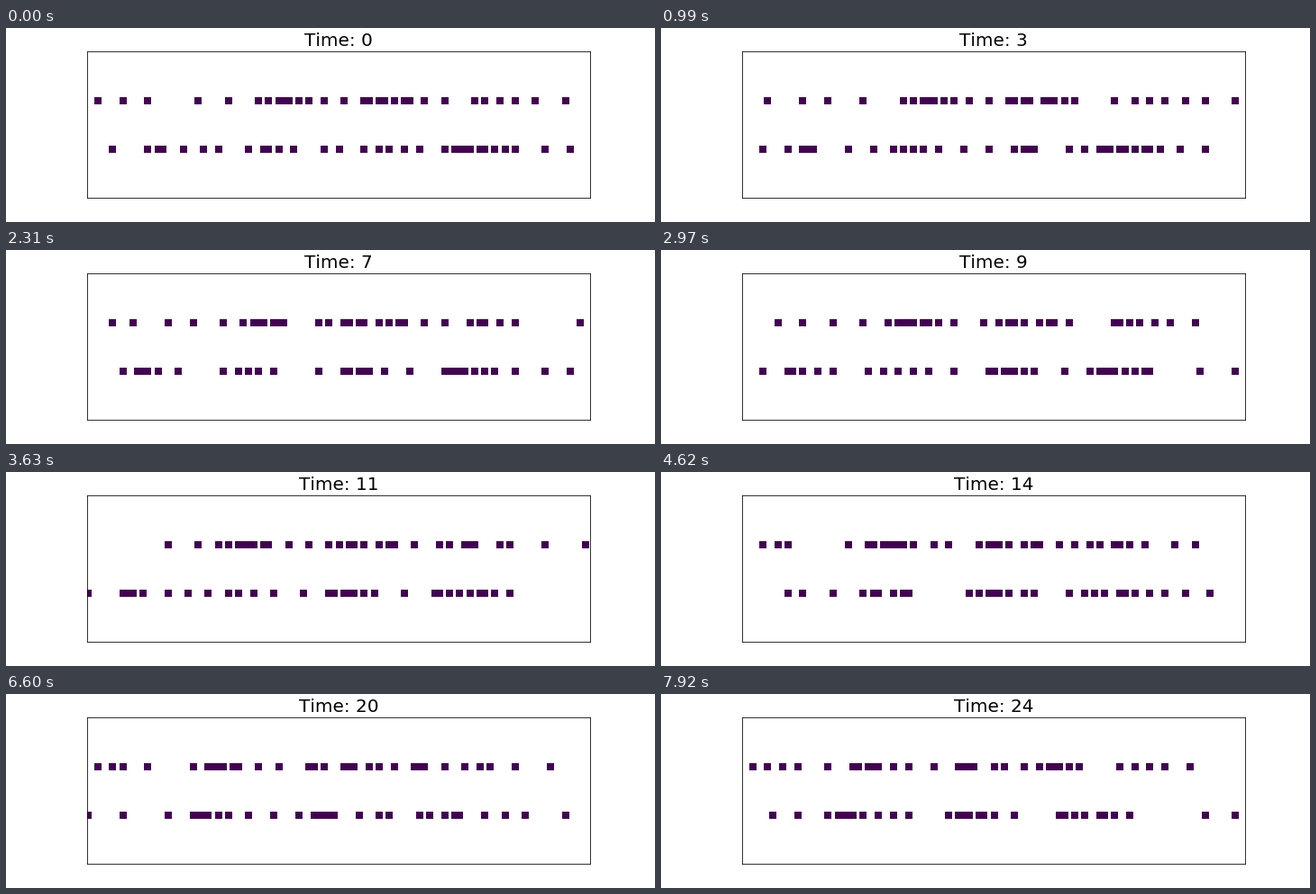
Write a matplotlib script that moves like this. It is 720x216 px and loops after 8000 ms.

```python
import math
import random

import matplotlib.pyplot as plt
from matplotlib.animation import FuncAnimation

CELLS = 100
CARS_PER_LANE = 30
V_MAX = 5
P_SLOW = 0.3
P_CHANGE = 0.3
WARM_UP = 3
STEP_MS = 330
LOOP_MS = 8000
TICK_MS = 20

JAMS = ((57, 75), (43, 60))  # dense spots of the lower and upper lane
NUDGE = 0.09, -0.009         # half a pixel right and down, in data units


def place_cars(jams, rng):
    """Scatter cars on a lane, more densely around its jams."""
    def rank(pos):
        weight = 0.6 + sum(2 * math.exp(-((pos - jam) / 5) ** 2)
                           for jam in jams)
        return rng.random() ** (1 / weight)

    cells = sorted(range(CELLS), key=rank)[-CARS_PER_LANE:]
    return {pos: min(2, gap(cells, pos)) for pos in sorted(cells)}


def gap(lane, pos, way=1):
    """Count the free cells from pos to the next car on a ring road."""
    free = 0
    while free < V_MAX and (pos + way * (free + 1)) % CELLS not in lane:
        free += 1
    return free


def change_lanes(road, rng):
    moved = [{}, {}]
    for i, lane in enumerate(road):
        other = road[1 - i]
        for pos, v in lane.items():
            ahead = gap(lane, pos)
            better = (ahead < min(v + 1, V_MAX)
                      and pos not in other
                      and gap(other, pos) > ahead
                      and gap(other, pos, -1) >= 3)
            swap = better and rng.random() < P_CHANGE
            moved[1 - i if swap else i][pos] = v
    return moved


def drive(lane, rng):
    moved = {}
    for pos, v in lane.items():
        v = min(v + 1, V_MAX, gap(lane, pos))
        if v > 0 and rng.random() < P_SLOW:
            v -= 1
        moved[(pos + v) % CELLS] = v
    return moved


def simulate(steps, seed=4):
    rng = random.Random(seed)
    road = [place_cars(jams, rng) for jams in JAMS]
    history = [road]
    for _ in range(WARM_UP + steps):
        road = [drive(lane, rng) for lane in change_lanes(road, rng)]
        history.append(road)
    return history[WARM_UP:]


history = simulate(LOOP_MS // STEP_MS)

plt.rcParams["text.kerning_factor"] = 6
fig = plt.figure(figsize=(10, 3), dpi=72, facecolor="white")
ax = fig.add_axes([0.125, 0.125, 0.775, 0.755])
ax.set(xlim=(0, CELLS), ylim=(0, 3), xticks=[], yticks=[])
title = ax.set_title("Time: 0", fontsize=20, fontfamily="DejaVu Sans")
cars = ax.scatter([], [], s=64, marker="s", color="#440154", linewidths=0)


def draw(tick):
    step = (tick * TICK_MS + TICK_MS // 2) // STEP_MS
    cars.set_offsets([(pos + NUDGE[0], y + NUDGE[1])
                      for y, lane in enumerate(history[step], 1)
                      for pos in lane])
    title.set_text(f"Time: {step}")
    return cars, title


anim = FuncAnimation(fig, draw, frames=LOOP_MS // TICK_MS, interval=TICK_MS,
                     repeat=True, repeat_delay=0)
plt.show()
```
